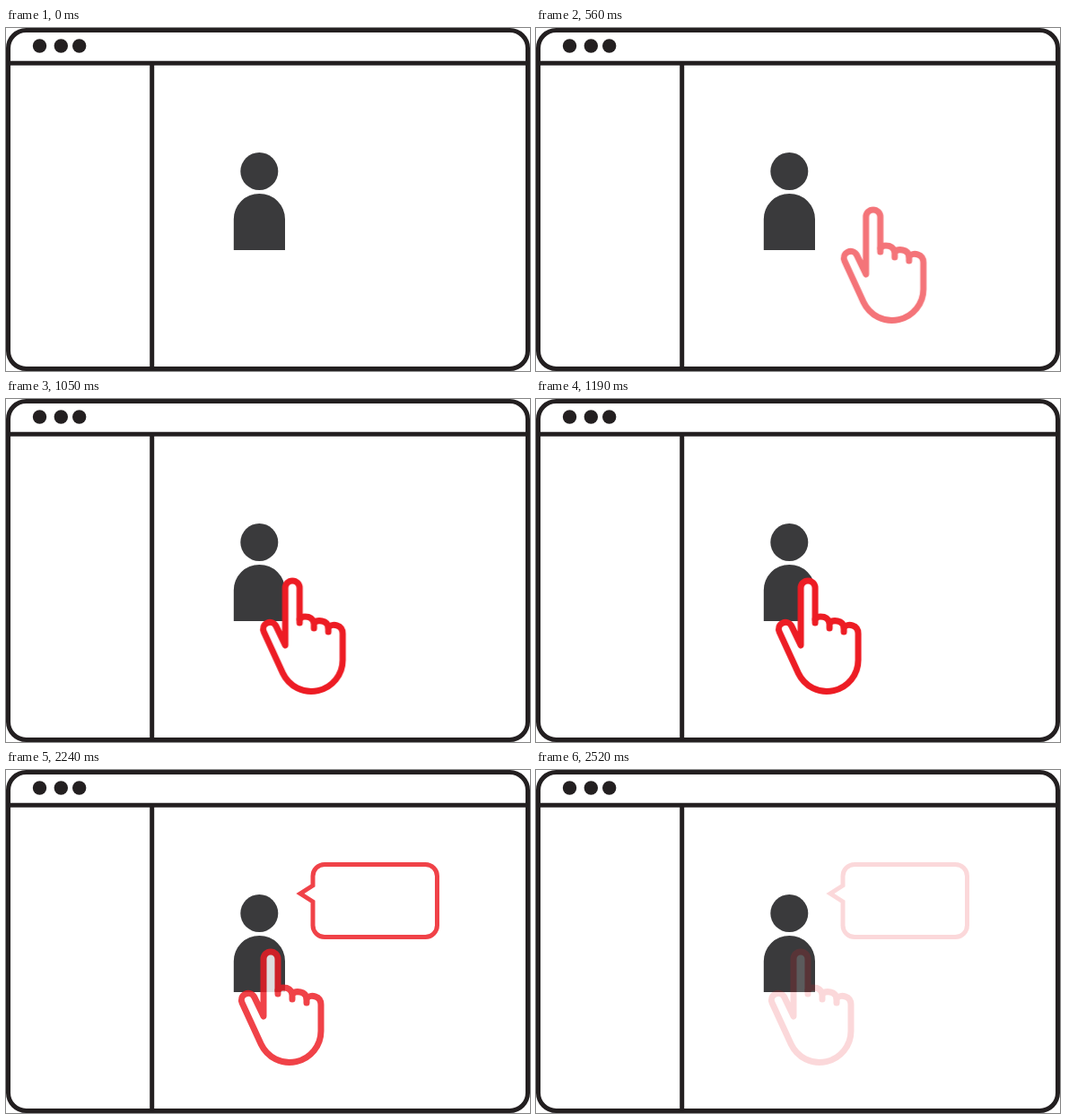
Recreate the animation shown at these times as an HTML page. Size 584 by 383 pixels, loop 2.59 s.

```html
<!DOCTYPE html>
<html lang="en">
<head>
<meta charset="utf-8">
<title>Click on a person</title>
<style>
  html, body { margin: 0; width: 100%; height: 100%; overflow: hidden; background: #fff; }
  svg { display: block; width: 584px; height: 383px; }

  .window { fill: none; stroke: #231f20; stroke-width: 5; }
  .dots { fill: #231f20; }
  .person { fill: #3a3a3c; }
  .red { fill: #fff; stroke: #ed1c24; }
  .bubble { stroke-width: 5; }
  .hand { stroke-width: 7; stroke-linecap: round; stroke-linejoin: round; }

  /* 37 ticks of 70 ms; the small negative delay keeps steps clear of tick edges */
  .hand, .bubble { animation: 2590ms -4ms infinite linear; }
  .hand { animation-name: slide, fade; }
  .bubble { animation-name: pop; }

  @keyframes slide {
    0% { transform: translateX(145.3px); animation-timing-function: steps(18); }
    48.6486%, 100% { transform: none; }
  }
  @keyframes fade {
    0% { opacity: 0; animation-timing-function: steps(13); }
    35.1351% { opacity: 1; }
    83.7838% { opacity: 1; animation-timing-function: steps(6); }
    100% { opacity: 0; }
  }
  @keyframes pop {
    0% { opacity: 0; animation-timing-function: step-end; }
    51.3514% { opacity: 1; }
    83.7838% { opacity: 1; animation-timing-function: steps(6); }
    100% { opacity: 0; }
  }
</style>
</head>
<body>
<svg viewBox="0 0 584 383">
  <g class="window">
    <rect x="2.5" y="2.5" width="579" height="378" rx="20"/>
    <path d="M2.5 39.3H581.5M162.7 39.3V380.5"/>
  </g>
  <g class="dots">
    <circle cx="37.5" cy="20" r="7.7"/>
    <circle cx="61.3" cy="20" r="7.7"/>
    <circle cx="81.7" cy="20" r="7.7"/>
  </g>
  <g class="person">
    <circle cx="282.3" cy="160" r="21"/>
    <path d="M253.8 248V213.5a28.6 28.6 0 0 1 57.2 0V248Z"/>
  </g>
  <path class="red bubble" d="M342 147L328 138L342 129V118.5a13 13 0 0 1 13-13H467.5a13 13 0 0 1 13 13V173.5a13 13 0 0 1-13 13H355a13 13 0 0 1-13-13Z"/>
  <g class="red hand">
    <path d="M287 275V211a8 8 0 0 1 16 0V246
      Q305 243 309 243C315 243 318 246 319 250
      C323 246 334 247 335 255
      C339 250 351 252 351 262V291.5
      A35 35 0 0 1 284.3 306.3L263.2 260.2
      A7.5 7.5 0 0 1 276.8 253.6Z"/>
    <path d="M303 246V250M319 250V256M335 255V260"/>
  </g>
</svg>
</body>
</html>
```
